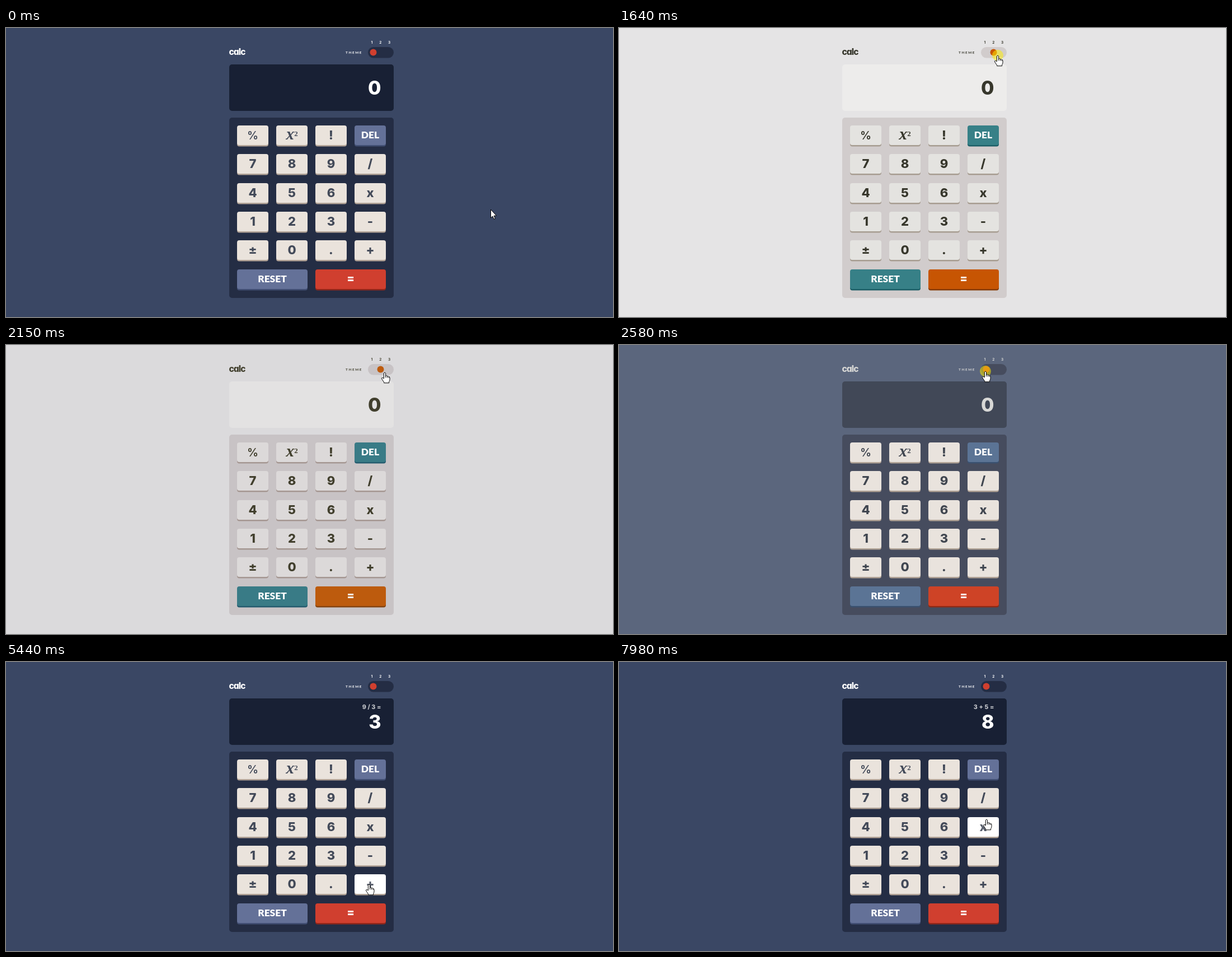
Write an HTML page that moves like this. It is 1085 px wide and 516 px high and loops after 8 s.

```html
<!DOCTYPE html>
<html lang="en">
<head>
<meta charset="utf-8">
<title>Calculator</title>
<style>
html, body { margin: 0; width: 100%; height: 100%; overflow: hidden; }
svg { display: block; width: 1085px; height: 516px; background: var(--bg); }
text { font: 800 22px Inter, "Open Sans", sans-serif; fill: var(--text); }
.key text { text-anchor: middle; fill: var(--label); }
.key .face { fill: var(--key); }
.key .edge { fill: var(--keyEdge); }
.key.alt .face { fill: var(--alt); }
.key.alt .edge { fill: var(--altEdge); }
.key.alt text { font: 900 17.4px Lato, sans-serif; fill: #fff; }
.key.eq .face { fill: var(--eq); }
.key.eq .edge { fill: var(--eqEdge); }
.key.eq text { font-weight: 900; font-size: 19px; fill: var(--eqText); }
.key.hover .face { fill: #fff; }
.key.hover text { opacity: .88; }
.key.alt.hover .face { fill: #a2b2e1; }
.key.eq.hover .face { fill: #f96b5b; }
.key .percent { font-weight: 600; font-size: 20px; }
.key .power { font: italic 700 25px "Noto Serif", serif; }
.key .power tspan { font: 700 13px "Liberation Serif", serif; }
#brand { font-size: 15.5px; letter-spacing: -.9px; font-feature-settings: "cv11"; }
#theme { font: 700 6.4px Lato, sans-serif; letter-spacing: 1.6px; }
.num { font-size: 6.5px; font-weight: 700; text-anchor: middle; }
#value { font-size: 34px; text-anchor: end; letter-spacing: -.5px; }
#sum { font-size: 11px; font-weight: 700; text-anchor: end; opacity: .8; }
.panel { fill: var(--panel); }
#screen { fill: var(--screen); }
#knob { fill: var(--eq); }
#ring { fill: #fe0; opacity: .52; }
#arrow, #hand { fill: #fff; stroke: #000; stroke-width: 1; stroke-linejoin: round; }
</style>
</head>
<body>
<svg id="stage" viewBox="0 0 1085 516">
  <text id="brand" x="398.5" y="48">calc</text>
  <text id="theme" x="607" y="45.5">THEME</text>
  <text class="num" x="654" y="28">1</text>
  <text class="num" x="669.3" y="28">2</text>
  <text class="num" x="685" y="28">3</text>
  <rect class="panel" x="647" y="34" width="46" height="19.5" rx="9.75"/>
  <circle id="knob" cy="43.6" r="6"/>
  <rect id="screen" x="399" y="65" width="294" height="83" rx="5"/>
  <text id="sum" x="670.5" y="84"></text>
  <text id="value" x="670" y="118.5"></text>
  <rect class="panel" x="399" y="160" width="294" height="322" rx="5"/>
  <g id="keys"></g>
  <g id="pointer">
    <circle id="ring" r="10"/>
    <path id="arrow" d="M.5 0V15L3.8 12L6.2 17.3L8.4 16.3L6.1 11.2H10.6Z"/>
    <path id="hand" d="M-1.6 1.5Q0-1 1.6 1.5V6Q3.6 5.4 4.4 6.8Q6.4 6.3 7 7.8Q9 7.6 9 10V13Q9 15 7.6 16.8V19H-1.4V17.5Q-4.6 13.5-5.8 10.6Q-4.6 8.4-1.6 11ZM1.6 6V9.5M4.4 7V9.8M7 8V10"/>
  </g>
</svg>
<script>
const LOOP = 8000, FADE = 200, REST = 150, RING_BEFORE = 40, RING_AFTER = 110;
const $ = id => document.getElementById(id);
const stage = $("stage");

const names = ["bg", "screen", "panel", "text", "label", "key", "keyEdge", "alt", "altEdge", "eq", "eqEdge", "eqText"];
const themes = [
  "3a4764 182034 242d44 ffffff 434a59 eae3dc b3a497 647198 414e73 d03f2f 93261a ffffff",
  "e6e6e6 eeeeec d2cdcd 36362c 36362c e5e4e1 a79e91 378187 1b6066 c85402 873901 ffffff",
  "17062a 1e0936 1e0936 ffe53d ffe53d 331c4d 881c9e 56077c be15f4 00ded0 6cf9f1 1a2327"
].map(row => row.split(" "));

// Places the pointer can visit; keys add themselves by label
const spots = {
  start: { x: 866, y: 324, w: 0, h: 0 },
  toggle: { x: 647, y: 34, w: 46, h: 19.5 }
};

function addKey(label, col, row, w = 56, kind = "", style = "") {
  const x = 413 + 70 * col, y = Math.round(174 + 51.35 * row);
  const g = document.createElementNS("http://www.w3.org/2000/svg", "g");
  const rect = (cls, dy) => `<rect class="${cls}" x="${x}" y="${y + dy}" width="${w}" height="35" rx="4"/>`;
  const base = kind ? 23.2 : 24.5;
  g.setAttribute("class", "key " + kind);
  g.innerHTML = rect("edge", 2.5) + rect("face", 0) +
    `<text class="${style}" x="${x + w / 2}" y="${y + base}">${label}</text>`;
  $("keys").append(g);
  spots[label] = { g, x, y, w, h: 37.5 };
}

addKey("%", 0, 0, 56, "", "percent");
addKey('x<tspan dy="-6">2</tspan>', 1, 0, 56, "", "power");
addKey("!", 2, 0);
addKey("DEL", 3, 0, 56, "alt");
["789/", "456x", "123-", "±0.+"].forEach((line, r) =>
  [...line].forEach((c, i) => addKey(c, i, r + 1)));
addKey("RESET", 0, 5, 126, "alt");
addKey("=", 2, 5, 126, "eq");

// One visit: arrival, spot, press time if any, offset from the spot's centre
const visit = (at, name, press, dx = 0, dy = 0) => {
  const s = spots[name];
  return { at, name, press, x: s.x + s.w / 2 + dx, y: s.y + s.h / 2 + dy, leave: press ? press + REST : at };
};
const visits = [
  visit(70, "start"),
  visit(780, "toggle", 1060, -12, 2),
  visit(1290, "toggle", 1638, 7, 5),
  visit(1900, "toggle", 2008, 7, 5),
  visit(2230, "toggle", 2480, -15, 3),
  visit(3240, "9", 3340, 7, 2),
  visit(3680, "/", 3750),
  visit(4130, "3", 4180),
  visit(4570, "=", 4770, 0, 17),
  visit(5400, "+", 5520, -2, -1),
  visit(5900, "0", 0, -38),
  visit(6250, "."),
  visit(6670, "5", 6790),
  visit(7190, "=", 7440, -10, 10),
  visit(7970, "x", 0, 6, -15)
];
const presses = visits.filter(v => v.press);

// Each press of the toggle moves up to the last theme and back again
const switches = [0, ...presses.filter(v => v.name === "toggle").map(v => v.press)]
  .map((at, i) => ({ at, theme: i < 3 ? i : 4 - i }));

function enter({ value, sum, left, op }, key) {
  if (key >= "0" && key <= "9") return { value: key, sum, left, op };
  if (key !== "=") return { value, sum: `${value} ${key}`, left: value, op: key };
  const result = op === "/" ? left / value : +left + +value;
  return { value: String(result), sum: `${sum} ${value} =` };
}
const readouts = [{ at: 0, value: "0", sum: "" }];
for (const { name, press } of presses) {
  if (name !== "toggle") readouts.push({ at: press, ...enter(readouts.at(-1), name) });
}

const lastIndex = (list, t) => Math.max(0, list.findLastIndex(item => item.at <= t));
const clamp = u => Math.min(1, Math.max(0, u));
const mix = (a, b, u) => a + (b - a) * u;
const smooth = u => u * u * (3 - 2 * u);
const inside = (p, s) => p.x >= s.x && p.x <= s.x + s.w && p.y >= s.y && p.y <= s.y + s.h;
const channels = hex => [0, 2, 4].map(i => parseInt(hex.slice(i, i + 2), 16));

// The CSS "ease" curve, solved by bisection
function ease(x) {
  const curve = (a, b, s) => 3 * a * s * (1 - s) ** 2 + 3 * b * s * s * (1 - s) + s ** 3;
  let lo = 0, hi = 1;
  for (let i = 0; i < 18; i++) {
    const mid = (lo + hi) / 2;
    if (curve(.25, .25, mid) < x) lo = mid; else hi = mid;
  }
  return curve(.1, 1, lo);
}

function pointerAt(t) {
  const i = lastIndex(visits, t), a = visits[i], b = visits[i + 1];
  if (!b) return a;
  const u = smooth(clamp((t - a.leave) / (b.at - a.leave)));
  return { x: mix(a.x, b.x, u), y: mix(a.y, b.y, u) };
}

function paintTheme(t) {
  const i = lastIndex(switches, t), { at, theme } = switches[i];
  const before = i ? switches[i - 1].theme : theme;
  const u = ease(clamp((t - at) / FADE));
  names.forEach((name, n) => {
    const to = channels(themes[theme][n]);
    const rgb = channels(themes[before][n]).map((c, k) => Math.round(mix(c, to[k], u)));
    stage.style.setProperty("--" + name, `rgb(${rgb})`);
  });
  // the knob jumps just after the press
  $("knob").setAttribute("cx", 656.5 + 13 * (t - at > 15 ? theme : before));
}

function render(t) {
  paintTheme(t);
  const { value, sum } = readouts[lastIndex(readouts, t)];
  $("value").textContent = value;
  $("sum").textContent = sum;

  const p = pointerAt(t);
  let over = false;
  for (const s of Object.values(spots)) {
    const hit = s.w > 0 && inside(p, s);
    if (s.g) s.g.classList.toggle("hover", hit);
    over = over || hit;
  }
  const show = (id, on) => { $(id).style.display = on ? "" : "none"; };
  $("pointer").setAttribute("transform", `translate(${p.x} ${p.y})`);
  show("hand", over);
  show("arrow", !over);
  show("ring", presses.some(v => t >= v.press - RING_BEFORE && t < v.press + RING_AFTER));
}

const origin = performance.now();
function frame() {
  render((performance.now() - origin) % LOOP);
  requestAnimationFrame(frame);
}
frame();
</script>
</body>
</html>
```
